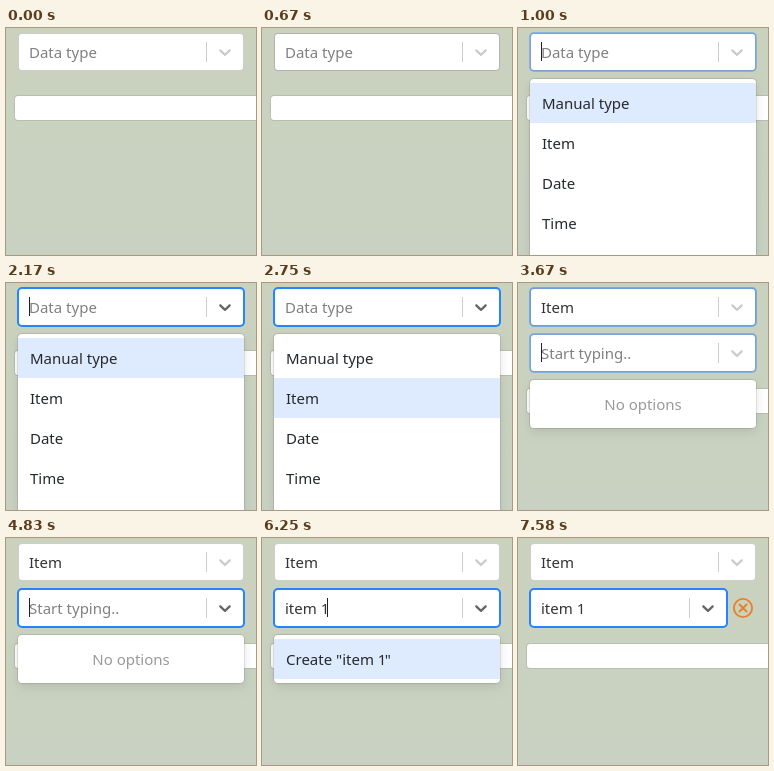
An HTML page with a canvas for the animation above (8 s loop, 250x227 px).

```html
<!DOCTYPE html>
<html lang="en">
<head>
<meta charset="utf-8">
<title>Select form</title>
<style>
html, body { margin: 0; width: 100%; height: 100%; overflow: hidden; background: #cad2bf; }
canvas { display: block; width: 250px; height: 227px; }
</style>
</head>
<body>
<canvas id="stage"></canvas>
<script>
const W = 250, H = 227, LOOP = 8000;
const LEFT = 12, RIGHT = 238, ROW = 38;
const FIRST_Y = 5, SECOND_Y = 51;
const GREY = [204, 204, 204], HOVER = [179, 179, 179], BLUE = [38, 132, 255];
const OPTIONS = ['Manual type', 'Item', 'Date', 'Time', 'Text'];
const TYPED = [[5330, 'i'], [5500, 'it'], [5580, 'ite'], [5750, 'item'], [5920, 'item '], [6250, 'item 1']];
const CARETS = [[1000, 1580], [2170, 2750], [3670, 4250], [4830, 6830]];
const CHEVRON = new Path2D('M4.516 7.548c.436-.446 1.043-.481 1.576 0l3.908 3.747 3.908-3.747c.533-.481 1.141-.446 1.574 0 .436.445.408 1.197 0 1.615-.406.418-4.695 4.502-4.695 4.502-.217.223-.502.335-.787.335s-.57-.112-.789-.335c0 0-4.287-4.084-4.695-4.502s-.436-1.17 0-1.615z');

const canvas = document.getElementById('stage');
const ctx = canvas.getContext('2d');
const scale = window.devicePixelRatio || 1;
canvas.width = W * scale;
canvas.height = H * scale;

const between = (t, from, to) => t >= from && t < to;
const mix = (a, b, k) => `rgb(${a.map((v, i) => Math.round(v + (b[i] - v) * k))})`;

const step = (t, at, full, part = 0.5) => t < at ? 0 : t < full ? part : 1;

function box(x, y, w, h, r, color) {
  ctx.fillStyle = color;
  ctx.beginPath();
  ctx.roundRect(x, y, w, h, r);
  ctx.fill();
}

// Draws text and returns its end; the digit 1 is set narrow.
function text(str, x, y, color) {
  ctx.fillStyle = color;
  for (const part of str.split(/(1)/)) {
    ctx.fillText(part, x, y);
    x += ctx.measureText(part).width - (part === '1' ? 1.6 : 0);
  }
  return x;
}

function control(y, { right = RIGHT, hover = 0, focus = 0, dark = false, label, color, caret, typed = '' }) {
  const w = right - LEFT;
  if (focus) {
    ctx.globalAlpha = focus;
    box(LEFT - 1, y - 1, w + 2, ROW + 2, 5, mix(BLUE, BLUE, 0));
    ctx.globalAlpha = 1;
  }
  const edge = focus ? mix(HOVER, BLUE, focus) : mix(GREY, HOVER, hover);
  box(LEFT, y, w, ROW, 4, edge);
  box(LEFT + 1, y + 1, w - 2, ROW - 2, 3, '#fff');
  ctx.fillStyle = '#ccc';
  ctx.fillRect(right - 38, y + 9, 1, 20);
  ctx.save();
  ctx.translate(right - 29, y + 9);
  ctx.fillStyle = dark ? '#666' : '#ccc';
  ctx.fill(CHEVRON);
  ctx.restore();
  const end = text(label, LEFT + 11, y + 25, color);
  if (caret) {
    ctx.fillStyle = '#222';
    ctx.fillRect(typed ? Math.floor(end) : LEFT + 11, y + 9, 1, 19);
  }
}

function menu(y, h) {
  box(LEFT - 1, y - 1, RIGHT - LEFT + 2, h + 2, 5, 'rgba(0,0,0,.1)');
  ctx.save();
  ctx.shadowColor = 'rgba(0,0,0,.1)';
  ctx.shadowBlur = 11 * scale;
  ctx.shadowOffsetY = 4 * scale;
  box(LEFT, y, RIGHT - LEFT, h, 4, '#fff');
  ctx.restore();
}

function option(label, y, active) {
  if (active) {
    ctx.fillStyle = '#deebff';
    ctx.fillRect(LEFT, y, RIGHT - LEFT, 40);
  }
  text(label, LEFT + 12, y + 26, '#25292d');
}

function removeIcon(alpha) {
  ctx.globalAlpha = alpha;
  ctx.strokeStyle = '#e6822b';
  ctx.lineWidth = 1.9;
  ctx.lineCap = 'round';
  ctx.beginPath();
  ctx.arc(225, 70, 9.1, 0, Math.PI * 2);
  ctx.moveTo(221.5, 66.5);
  ctx.lineTo(228.5, 73.5);
  ctx.moveTo(228.5, 66.5);
  ctx.lineTo(221.5, 73.5);
  ctx.stroke();
  ctx.globalAlpha = 1;
}

function draw(t) {
  const chosen = t >= 2830, second = t >= 3670;
  const caret = CARETS.some(([a, b]) => between(t, a, b));
  const typed = TYPED.reduce((s, [at, str]) => t >= at ? str : s, '');

  ctx.setTransform(scale, 0, 0, scale, 0, 0);
  ctx.font = '15px "Noto Sans", sans-serif';
  const sky = ctx.createLinearGradient(0, 0, 0, H);
  sky.addColorStop(0, '#cad2be');
  sky.addColorStop(1, '#c9d2c2');
  ctx.fillStyle = sky;
  ctx.fillRect(0, 0, W, H);

  const barY = chosen ? 105 : 67;
  box(8, barY, 260, 26, 4, 'rgba(0,0,0,.09)');
  box(9, barY + 1, 260, 24, 3, '#fff');

  control(FIRST_Y, {
    hover: chosen ? 0 : step(t, 580, 670),
    focus: second ? 0.5 * (t < 3750) : step(t, 1000, 1080, 0.4),
    dark: between(t, 1080, 3670),
    label: chosen ? 'Item' : 'Data type',
    color: chosen ? '#333' : '#808080',
    caret: caret && !chosen
  });

  if (chosen) {
    control(SECOND_Y, {
      right: t >= 7500 ? 209 : RIGHT,
      hover: step(t, 3250, 3330),
      focus: step(t, 3670, 3750, 0.4),
      dark: t >= 3750,
      label: typed || 'Start typing..',
      color: typed ? '#333' : '#808080',
      caret: caret && second,
      typed
    });
    if (t >= 7500) removeIcon(step(t, 7500, 7580));
  }

  if (between(t, 1000, 2830)) {
    menu(51, 208);
    const active = t < 2250 ? 0 : 1;
    OPTIONS.forEach((label, i) => option(label, 55 + i * 40, i === active));
  }
  if (between(t, 3670, 7080)) {
    menu(97, 48);
    if (typed) {
      option(`Create "${typed}"`, 101, true);
    } else {
      const label = 'No options';
      text(label, (LEFT + RIGHT - ctx.measureText(label).width) / 2, 127, '#999');
    }
  }
}

const start = performance.now();
function tick() {
  draw((performance.now() - start) % LOOP);
  requestAnimationFrame(tick);
}
tick();
</script>
</body>
</html>
```
